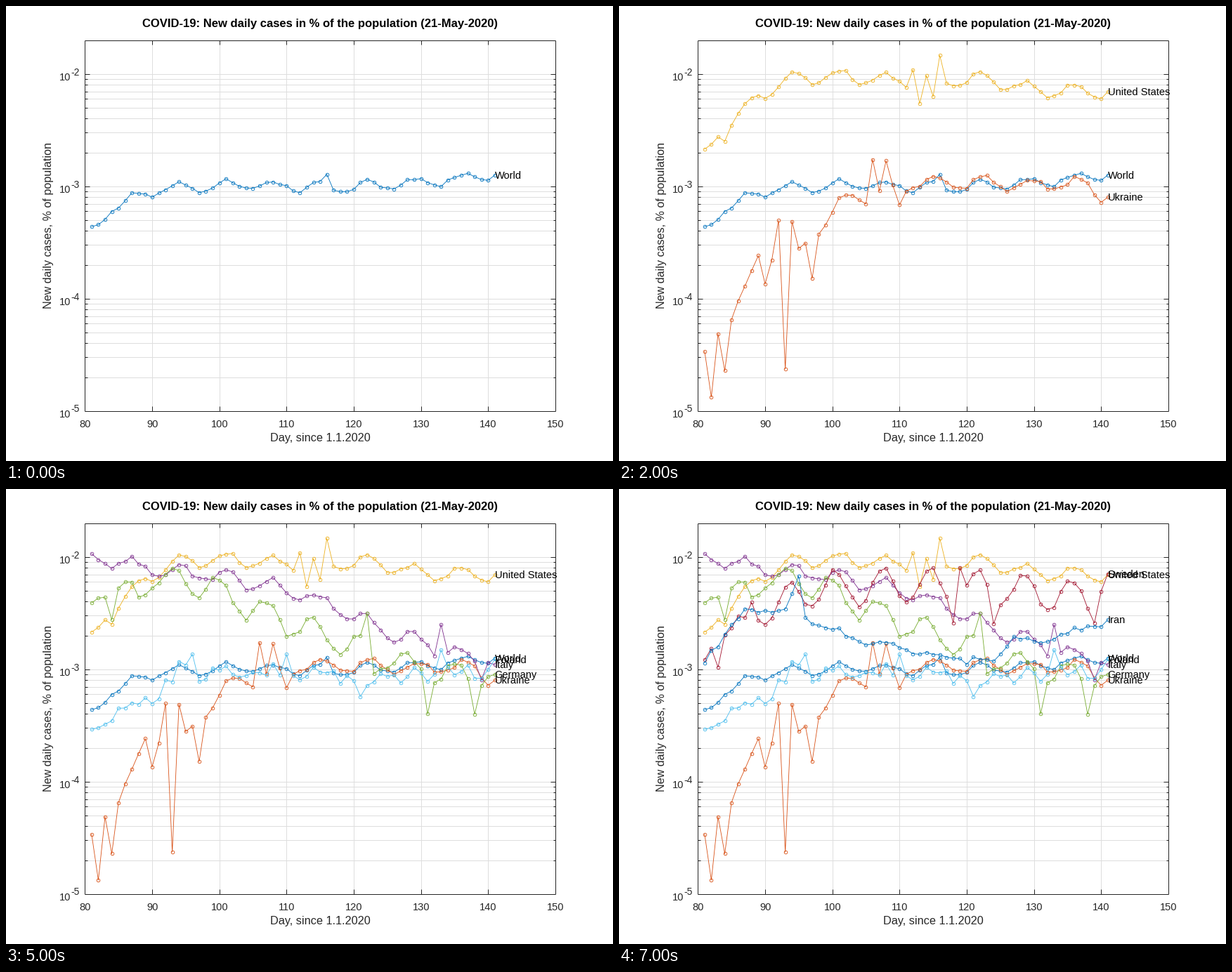
Recreate the animation shown at these times as a matplotlib script. Size 864x648 px, loop 8 s.

```python
import math

import matplotlib.pyplot as plt
import numpy as np
from matplotlib.animation import FuncAnimation

W, H = 864, 648
LEFT, RIGHT, TOP, BOTTOM = 112.3, 781.9, 48.6, 576.7
DECADE = (BOTTOM - TOP) / (3 + math.log10(2))
DAYS = np.arange(81, 142)
INK = "#262626"
GRID = "#dedede"

plt.rcParams["font.family"] = "Liberation Sans"
fig = plt.figure(figsize=(W / 72, H / 72), dpi=72, facecolor="white")
ax = fig.add_axes([0, 0, 1, 1])
ax.set_xlim(0, W)
ax.set_ylim(H, 0)
ax.axis("off")


def day_x(day):
    return LEFT + (RIGHT - LEFT) * (day - 80) / 70


def power_y(power):
    return BOTTOM - DECADE * (power + 5)


def seg(x0, y0, x1, y1, color=INK, z=2):
    ax.plot([x0, x1], [y0, y1], color=color, lw=1, zorder=z,
            solid_capstyle="butt", snap=True)


def write(x, y, text, size, color=INK, ha="center", **kw):
    return ax.text(x, y, text, fontsize=size, color=color, ha=ha,
                   va="baseline", zorder=6, **kw)


def draw_axes():
    for day in range(80, 151, 10):
        x = day_x(day)
        if 80 < day < 150:
            seg(x, TOP, x, BOTTOM, GRID, 1)
            seg(x, BOTTOM, x, BOTTOM - 6.5)
            seg(x, TOP, x, TOP + 6.5)
        write(x + 0.3, 599.5, str(day), 14.67)

    for power in range(-5, -1):
        for m in range(1, 10):
            y = power_y(power + math.log10(m))
            if y < TOP + 1:
                break
            size = 6.5 if m == 1 else 3.2
            if y < BOTTOM - 1:
                seg(LEFT, y, RIGHT, y, GRID, 1)
                seg(LEFT, y, LEFT + size, y)
                seg(RIGHT, y, RIGHT - size, y)
        y = power_y(power)
        write(76.3, y + 9.3, "10", 14.67, ha="left")
        write(92.8, y + 1.8, str(power), 13.8, ha="left")

    for y in (TOP, BOTTOM):
        seg(LEFT, y, RIGHT, y)
    for x in (LEFT, RIGHT):
        seg(x, TOP, x, BOTTOM)

    write(447.3, 30.3, "COVID-19: New daily cases in % of the population "
          "(21-May-2020)", 16.6, "black", weight="bold")
    write(447.5, 620, "Day, since 1.1.2020", 16.2)
    write(65, 312.5, "New daily cases, % of population", 16.1,
          rotation=90, rotation_mode="anchor")


series = []


def add(name, color, trend, swing, peak, noise, shocks={}):
    """Log-linear trend (thousandths of a percent by day), a weekly swing
    that grows in, random jitter and a few one-day shocks in decades."""
    rng = np.random.default_rng(len(series) + 1)
    power = np.interp(DAYS, list(trend), np.log10(list(trend.values())))
    wave = swing * np.cos(2 * np.pi * (DAYS - peak) / 7)
    wave *= np.clip((DAYS - 81) / 12, 0, 1)
    wave += noise * rng.uniform(-1.5, 1.5, DAYS.size)
    wave[[0, -1]] = 0  # both ends sit on the trend
    for day, jump in shocks.items():
        wave[day - 81] += jump

    xs, ys = day_x(DAYS), power_y(power + wave - 3)
    line, = ax.plot(xs, ys, color=color, lw=0.85, marker="o",
                    markersize=4.6, markerfacecolor="none",
                    markeredgewidth=0.85, zorder=3 + 0.1 * len(series))
    label = write(xs[-1] - 0.2, ys[-1] + 5.2, name, 14.67, "black", "left")
    series.append((line, label))


draw_axes()

add("World", "#0072bd",
    {81: .437, 83: .53, 87: .81, 92: .95, 101: 1.03, 109: 1, 118: .98,
     130: 1.07, 141: 1.26},
    swing=.045, peak=122, noise=.012, shocks={82: -.04, 116: .07})

add("Ukraine", "#d95319",
    {81: .034, 85: .066, 89: .244, 95: .249, 101: .71, 112: 1.06,
     130: 1.05, 138: 1, 141: .8},
    swing=.06, peak=122.5, noise=.02,
    shocks={82: -.47, 84: -.35, 90: -.24, 92: .36, 93: -1.03, 94: .23,
            97: -.36, 106: .32, 108: .2, 110: -.15})

add("United States", "#edb120",
    {81: 2.14, 84: 3.1, 88: 6, 94: 9, 101: 9.6, 108: 8.8, 115: 8.5,
     122: 9, 130: 7.2, 141: 6.95},
    swing=.06, peak=122, noise=.012,
    shocks={84: -.08, 112: .17, 113: -.19, 115: -.18, 116: .19})

add("Italy", "#7e2f8e",
    {81: 10.7, 83: 8.4, 87: 9.1, 91: 7.1, 95: 7.2, 102: 6.4, 110: 5.1,
     118: 3.4, 126: 2.05, 134: 1.45, 141: 1.1},
    swing=.06, peak=122, noise=.018, shocks={133: .25, 139: -.14, 140: .06})

add("Germany", "#77ac30",
    {81: 3.9, 85: 5.3, 92: 6.2, 99: 5.4, 106: 3.2, 113: 2.35, 120: 1.6,
     127: 1.15, 134: .85, 141: .9},
    swing=.12, peak=121, noise=.02,
    shocks={84: -.23, 88: -.07, 122: .24, 123: -.14, 131: -.25, 138: -.22})

add("Poland", "#4dbeee",
    {81: .292, 87: .46, 90: .58, 94: .95, 101: .95, 110: .93, 122: .82,
     133: .93, 139: .95, 141: 1.23},
    swing=.035, peak=122, noise=.04,
    shocks={96: .13, 110: .18, 121: -.16, 122: -.14, 133: .2})

add("Sweden", "#a2142f",
    {81: 1.21, 84: 2.2, 88: 2.8, 94: 4.4, 100: 5.3, 115: 5.7, 128: 5,
     138: 4.4, 141: 7.1},
    swing=.15, peak=121.5, noise=.02,
    shocks={83: -.23, 88: .11, 118: -.15, 119: .24, 124: -.24, 139: -.18})

add("Iran", "#0072bd",
    {81: 1.14, 87: 3.4, 93: 3.5, 95: 6.27, 96: 2.96, 100: 2.15, 110: 1.58,
     123: 1.1, 127: 1.9, 131: 1.75, 141: 2.76},
    swing=.02, peak=122, noise=.022)


def show(frame):
    for i, (line, label) in enumerate(series):
        line.set_visible(i <= frame)
        label.set_visible(i <= frame)
    return [artist for pair in series for artist in pair]


anim = FuncAnimation(fig, show, frames=8, interval=1000, repeat=True,
                     repeat_delay=0, init_func=lambda: show(0))
plt.show()
```
